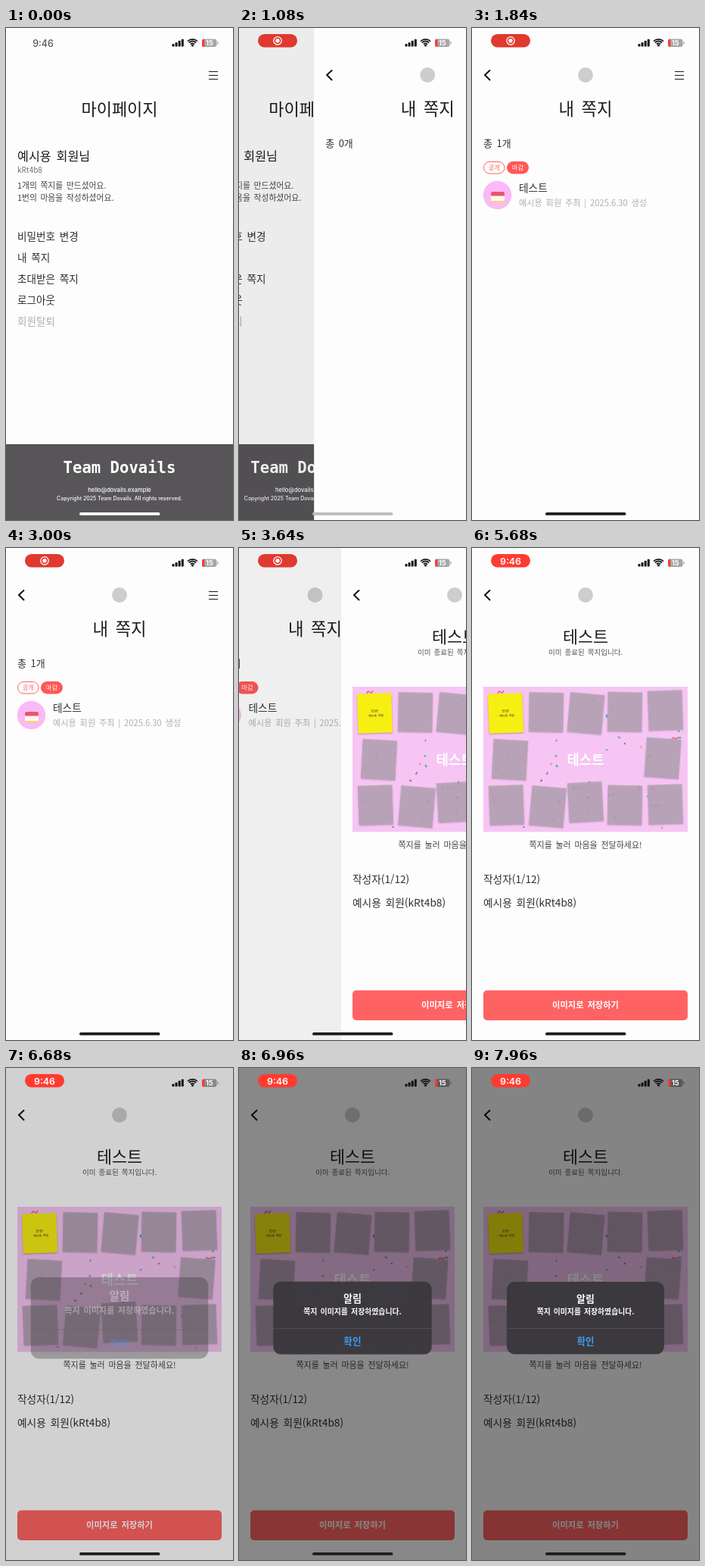
Recreate the animation shown at these times as an HTML page with a canvas. Size 300x649 px, loop 8000 ms.

```html
<!DOCTYPE html>
<html lang="ko">
<head>
<meta charset="utf-8">
<title>마이페이지</title>
<style>
html, body { margin: 0; width: 100%; height: 100%; overflow: hidden; background: #fff; }
canvas { display: block; width: 300px; height: 649px; }
</style>
</head>
<body>
<canvas id="stage"></canvas>
<script>
const W = 300, H = 649, LOOP = 8000;
const KR = '"Noto Sans CJK KR", "Noto Sans CJK", sans-serif';
const UI = 'Inter, sans-serif';
const MONO = '"DejaVu Sans Mono", monospace';
const INK = '#303030', TITLE = '#1a1a1a', CORAL = '#ff6262';
const USER = '예시용 회원', USER_ID = 'kRt4b8', TEAM = 'Team Dovails';

// Moments of the story, in ms
const T = { pill: 320, list: 880, loaded: 1500, detail: 3480, clock: 3800, alert: 6590 };

const canvas = document.getElementById('stage');
const ctx = canvas.getContext('2d');
const ratio = Math.max(1, window.devicePixelRatio || 1);
canvas.width = W * ratio;
canvas.height = H * ratio;

const clamp = v => Math.min(1, Math.max(0, v));
const ramp = (t, start, span) => clamp((t - start) / span);

// Critically damped spring from 0 to 1
function spring(t, start, speed) {
  const x = Math.max(0, t - start) / 1000 * speed;
  return x > 11 ? 1 : 1 - (1 + x) * Math.exp(-x);
}

function seeded(seed) {
  return () => (seed = (seed * 16807) % 2147483647) / 2147483647;
}

function text(str, x, y, size, { color = INK, align = 'left', weight = 300, font = KR } = {}) {
  ctx.font = `${weight} ${size}px ${font}`;
  ctx.wordSpacing = font === KR ? `${size * 0.2}px` : '0px';
  ctx.textAlign = align;
  ctx.fillStyle = color;
  ctx.fillText(str, x, y + size * 0.37);
}

const centered = (str, y, size, opts = {}) => text(str, 150, y, size, { align: 'center', ...opts });

function box(x, y, w, h, r, fill) {
  ctx.beginPath();
  ctx.roundRect(x, y, w, h, r);
  ctx.fillStyle = fill;
  ctx.fill();
}

function disc(x, y, r, fill) {
  ctx.beginPath();
  ctx.arc(x, y, r, 0, Math.PI * 2);
  ctx.fillStyle = fill;
  ctx.fill();
}

function line(points, color, width) {
  ctx.beginPath();
  points.forEach(([x, y]) => ctx.lineTo(x, y));
  ctx.strokeStyle = color;
  ctx.lineWidth = width;
  ctx.stroke();
}

function faded(alpha, draw) {
  if (alpha <= 0) return;
  ctx.save();
  ctx.globalAlpha *= alpha;
  draw();
  ctx.restore();
}

function shade(alpha) {
  ctx.fillStyle = `rgba(0,0,0,${alpha})`;
  ctx.fillRect(0, 0, W, H);
}

function page(x, draw) {
  ctx.save();
  ctx.translate(x, 0);
  ctx.fillStyle = '#fdfdfd';
  ctx.fillRect(0, 0, W, H);
  draw();
  ctx.restore();
}

function menuIcon() {
  for (const y of [57.5, 62.5, 67.5]) line([[268, y], [280, y]], '#222', 1.1);
}

function header() {
  line([[24, 55.5], [17, 62], [24, 69]], '#111', 2);
  disc(150, 62, 10, '#cdcdcd');
}

function myPage() {
  menuIcon();
  centered('마이페이지', 107, 22, { color: TITLE });
  text(USER + '님', 15, 169, 16.2, { color: TITLE });
  text(USER_ID, 15, 187, 10, { color: '#707070' });
  text('1개의 쪽지를 만드셨어요.', 15, 208, 10.8, { color: '#444' });
  text('1번의 마음을 작성하셨어요.', 15, 224, 10.8, { color: '#444' });
  ['비밀번호 변경', '내 쪽지', '초대받은 쪽지', '로그아웃', '회원탈퇴'].forEach((label, i) =>
    text(label, 15, 275 + i * 28, 13.6, { color: i === 4 ? '#b0b0b0' : INK }));
  ctx.fillStyle = '#575558';
  ctx.fillRect(0, 549, W, 100);
  centered(TEAM, 579, 20.6, { color: '#fff', weight: 700, font: MONO });
  centered('hello@dovails.example', 609, 7.6, { color: '#fff', font: UI, weight: 500 });
  centered(`Copyright 2025 ${TEAM}. All rights reserved.`, 620, 7, { color: '#fff', font: UI, weight: 500 });
}

function cake() {
  disc(33.5, 220.5, 18.7, '#fbb9f7');
  box(25, 219, 18, 11, 1, '#fff8f0');
  box(25, 216, 18, 5.5, [2.5, 2.5, 1, 1], '#e8576c');
  box(24, 228, 20, 2.5, 1, '#f3d27a');
}

function listPage(loaded) {
  header();
  menuIcon();
  centered('내 쪽지', 107, 22.3, { color: TITLE });
  text(`총 ${loaded ? 1 : 0}개`, 15, 152, 13);
  if (!loaded) return;
  ctx.beginPath();
  ctx.roundRect(15.5, 176.5, 27.5, 15.5, 7.7);
  ctx.strokeStyle = CORAL;
  ctx.lineWidth = 1;
  ctx.stroke();
  text('공개', 29.3, 184.2, 8, { color: CORAL, align: 'center' });
  box(46, 176, 29, 16.5, 8.2, '#ff5757');
  text('마감', 60.5, 184.2, 8.4, { color: '#fff', align: 'center', weight: 400 });
  cake();
  text('테스트', 62, 211, 13.7);
  text(`${USER} 주최 | 2025.6.30 생성`, 62, 231, 11.2, { color: '#b0b0b0' });
}

// Centre x, centre y, tilt in degrees
const NOTES = [
  [44.5, 218, -2], [98, 216.5, 1], [150.5, 218, 5], [202, 216, 1], [255.5, 214, -2],
  [50, 279, 3], [252, 277, 4],
  [45.5, 339, -2], [100, 341, 5], [150, 335, -3], [202, 339, 1], [255.5, 338, -2]
];

function confetti() {
  const rnd = seeded(4271);
  const colors = ['#e0566b', '#55a5cf', '#eda05a', '#46b4ad', '#c25fc9'];
  for (let i = 0; i < 46; i++) {
    ctx.save();
    ctx.translate(20 + rnd() * 260, 187 + rnd() * 182);
    ctx.rotate(rnd() * Math.PI);
    ctx.fillStyle = colors[i % colors.length];
    ctx.fillRect(-1.5, -1, 2 + rnd() * 2, 1.5 + rnd());
    ctx.restore();
  }
  const curls = [[38, 190, '#e0566b'], [143, 317, '#e58a78'], [268, 251, '#e0566b'], [241, 340, '#55a5cf']];
  for (const [x, y, color] of curls) {
    ctx.beginPath();
    ctx.moveTo(x - 4, y + 2);
    ctx.bezierCurveTo(x - 2, y - 6, x + 1, y + 6, x + 4, y - 2);
    ctx.strokeStyle = color;
    ctx.lineWidth = 1.3;
    ctx.stroke();
  }
}

function board() {
  ctx.save();
  ctx.beginPath();
  ctx.rect(15, 183, 270, 191.5);
  ctx.clip();
  ctx.fillStyle = '#f6c5f3';
  ctx.fillRect(15, 183, 270, 192);
  confetti();
  NOTES.forEach(([x, y, tilt], i) => {
    ctx.save();
    ctx.translate(x, y);
    ctx.rotate(tilt * Math.PI / 180);
    ctx.shadowColor = 'rgba(70,40,70,.35)';
    ctx.shadowBlur = 2 * ratio;
    ctx.shadowOffsetY = ratio;
    ctx.fillStyle = i ? 'rgba(180,166,181,.8)' : '#f8ef12';
    ctx.fillRect(-22.7, -26, 45.4, 52);
    ctx.shadowColor = 'transparent';
    if (!i) {
      text('안녕!', 0, -3, 4.5, { align: 'center' });
      text('- ' + USER, 0, 3, 4, { align: 'center' });
    }
    ctx.restore();
  });
  centered('테스트', 279, 17.8, { color: '#fff', weight: 900 });
  ctx.restore();
}

function detailPage() {
  header();
  centered('테스트', 117, 21.8, { color: TITLE });
  centered('이미 종료된 쪽지입니다.', 137, 9.5, { color: '#555' });
  board();
  centered('쪽지를 눌러 마음을 전달하세요!', 392, 11, { color: '#444' });
  text('작성자(1/12)', 15, 437, 13.7);
  text(`${USER}(${USER_ID})`, 15, 468, 13.7);
  box(15, 583.5, 270, 39.5, 5, CORAL);
  centered('이미지로 저장하기', 603, 11.3, { color: '#fff', weight: 600 });
}

function alertBox(p) {
  if (p <= 0) return;
  shade(0.48 * p);
  faded(p, () => {
    const s = 1.2 - 0.2 * p;
    ctx.translate(150, 329.7);
    ctx.scale(s, s);
    ctx.translate(-150, -329.7);
    box(46, 282, 208, 95.5, 10, '#3b393d');
    centered('알림', 304, 13, { color: '#fff', weight: 700 });
    centered('쪽지 이미지를 저장하였습니다.', 321, 9.8, { color: '#fff', weight: 600 });
    line([[46, 343.5], [254, 343.5]], '#58565a', 0.8);
    centered('확인', 360, 12.6, { color: '#3d9cf5', weight: 600 });
  });
}

function statusBar(t) {
  const pill = ramp(t, T.pill, 200), clock = ramp(t, T.clock, 200);
  const time = (x, y, color, weight) =>
    text('9:46', x, y, 12.4, { color, weight, align: 'center', font: UI });
  faded(1 - pill, () => time(49, 20, '#555', 500));
  faded(pill, () => {
    box(25, 8, 52, 17.5, 8.7, clock > 0.5 ? '#ff3b30' : '#e0392f');
    faded(clock, () => time(51, 17, '#fff', 600));
    faded(1 - clock, () => {
      ctx.beginPath();
      ctx.arc(51, 16.8, 5.2, 0, Math.PI * 2);
      ctx.strokeStyle = '#fff';
      ctx.lineWidth = 1.3;
      ctx.stroke();
      disc(51, 16.8, 2.7, '#fff');
    });
  });

  for (let i = 0; i < 4; i++) {
    const h = 3.5 + i * 2.1;
    box(219.5 + i * 4.1, 24.5 - h, 3, h, 0.8, '#111');
  }
  for (const r of [3.6, 6.6, 9.2]) {
    ctx.beginPath();
    ctx.arc(246.5, 24, r, -Math.PI * 0.75, -Math.PI * 0.25);
    ctx.strokeStyle = '#111';
    ctx.lineWidth = 1.7;
    ctx.stroke();
  }
  disc(246.5, 23, 1.5, '#111');
  box(259, 14.5, 19.5, 10.5, 3, 'rgba(0,0,0,.34)');
  box(259, 14.5, 3.2, 10.5, [3, 0, 0, 3], '#ff3b30');
  box(279.3, 18, 1.3, 3.6, 0.6, 'rgba(0,0,0,.34)');
  text('15', 268.8, 19.8, 9, { color: '#fff', align: 'center', weight: 700, font: UI });
}

function homeBar(p) {
  const v = Math.round(255 - 225 * p * p * p);
  box(97, 639, 106.5, 3.8, 1.9, `rgb(${v},${v},${v})`);
}

// The new page slides over the old one, which drifts left and darkens
function push(p, below, above) {
  if (p < 0.9995) {
    page(-90 * p, below);
    shade(0.1 * p);
  }
  if (p > 0) page(W * (1 - p), above);
}

function render(t) {
  ctx.setTransform(ratio, 0, 0, ratio, 0, 0);
  const toList = spring(t, T.list, 11.45);
  const toDetail = spring(t, T.detail, 11.45);
  const list = () => listPage(t >= T.loaded);
  if (t < T.detail) push(toList, myPage, list);
  else push(toDetail, list, detailPage);
  alertBox(spring(t, T.alert, 14));
  statusBar(t);
  homeBar(toList);
}

const began = performance.now();
function tick() {
  render((performance.now() - began) % LOOP);
  requestAnimationFrame(tick);
}
tick();
</script>
</body>
</html>
```
